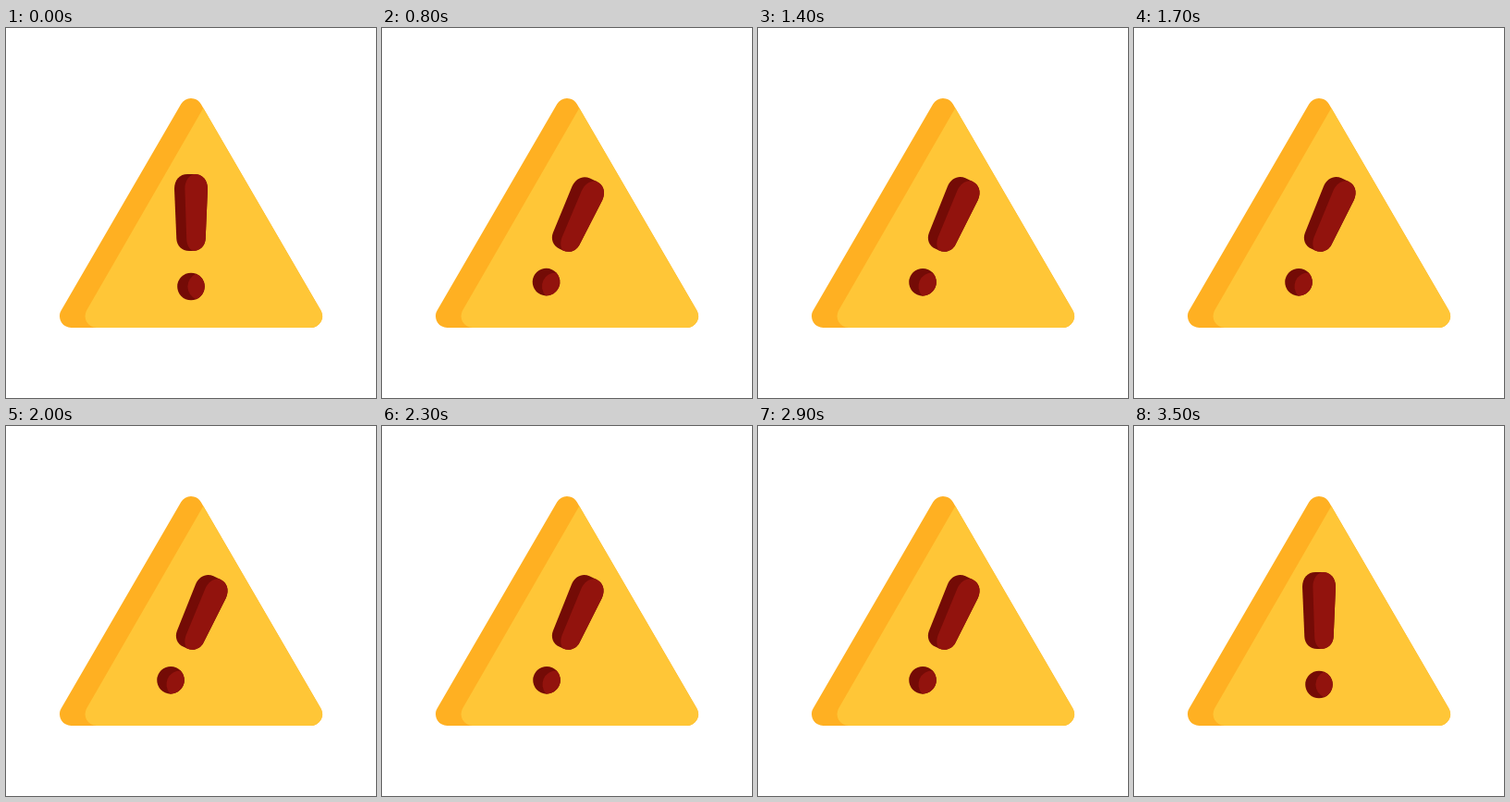
Recreate the animation shown at these times as an HTML page. Size 400 px wide and 400 px high, loop 3530 ms.

```html
<!DOCTYPE html>
<html lang="en">
<head>
<meta charset="utf-8">
<title>Warning sign</title>
<style>
  html, body { margin: 0; height: 100%; overflow: hidden; background: #fff; }
  svg { display: block; width: 100%; height: 100%; }
</style>
</head>
<body>
<svg viewBox="0 0 400 400">
  <path d="M200 88.5 70.5 311.5H329.5Z" fill="#ffb022" stroke="#ffb022" stroke-width="25" stroke-linejoin="round"/>
  <path d="M213.3 86.5 87.2 305.3A12.5 12.5 0 0 0 98 324H329.5A12.5 12.5 0 0 0 340.3 305.2Z" fill="#ffc637"/>
  <g id="mark">
    <g fill="#740b06">
      <path d="M182 174C182 164 188 158 196 158H204C212 158 218 164 218 174L215.7 228C215.4 235 210 241 202 241H198C190 241 184.6 235 184.3 228Z"/>
      <circle cx="200" cy="279.5" r="14.8"/>
    </g>
    <g fill="#92130d">
      <path d="M193.4 174C193.4 166 197 160 203 158H204C212 158 218 164 218 174L215.7 228C215.4 235 210 241 202 241C198 239 195.4 234 195.2 228Z"/>
      <path d="M205.6 265.8A14.8 14.8 0 0 0 205.6 293.2A14.8 14.8 0 0 0 205.6 265.8Z"/>
    </g>
  </g>
</svg>
<script>
const LOOP = 3530, HOLD = 530, STEP = 30, TILT = 28;
const mark = document.getElementById('mark');

// Turning points of the swing: [time in ms, angle in degrees]
const turns = [[500, 0], [662.5, -TILT]];
for (let i = 0; i <= 15; i++) turns.push([825 + i * 150, i % 2 ? -TILT : TILT]);
turns.push([3275, 6], [3500, 0]);

function angleAt(time) {
  const next = turns.findIndex(([t]) => t > time);
  if (next < 1) return 0;
  const [t0, a0] = turns[next - 1], [t1, a1] = turns[next];
  const eased = (1 - Math.cos(Math.PI * (time - t0) / (t1 - t0))) / 2;
  return a0 + (a1 - a0) * eased;
}

function draw() {
  const time = performance.now() % LOOP;
  const stepped = time < HOLD ? 0 : HOLD + Math.floor((time - HOLD) / STEP) * STEP;
  mark.setAttribute('transform', `rotate(${angleAt(stepped)} 200 226)`);
  requestAnimationFrame(draw);
}
draw();
</script>
</body>
</html>
```
